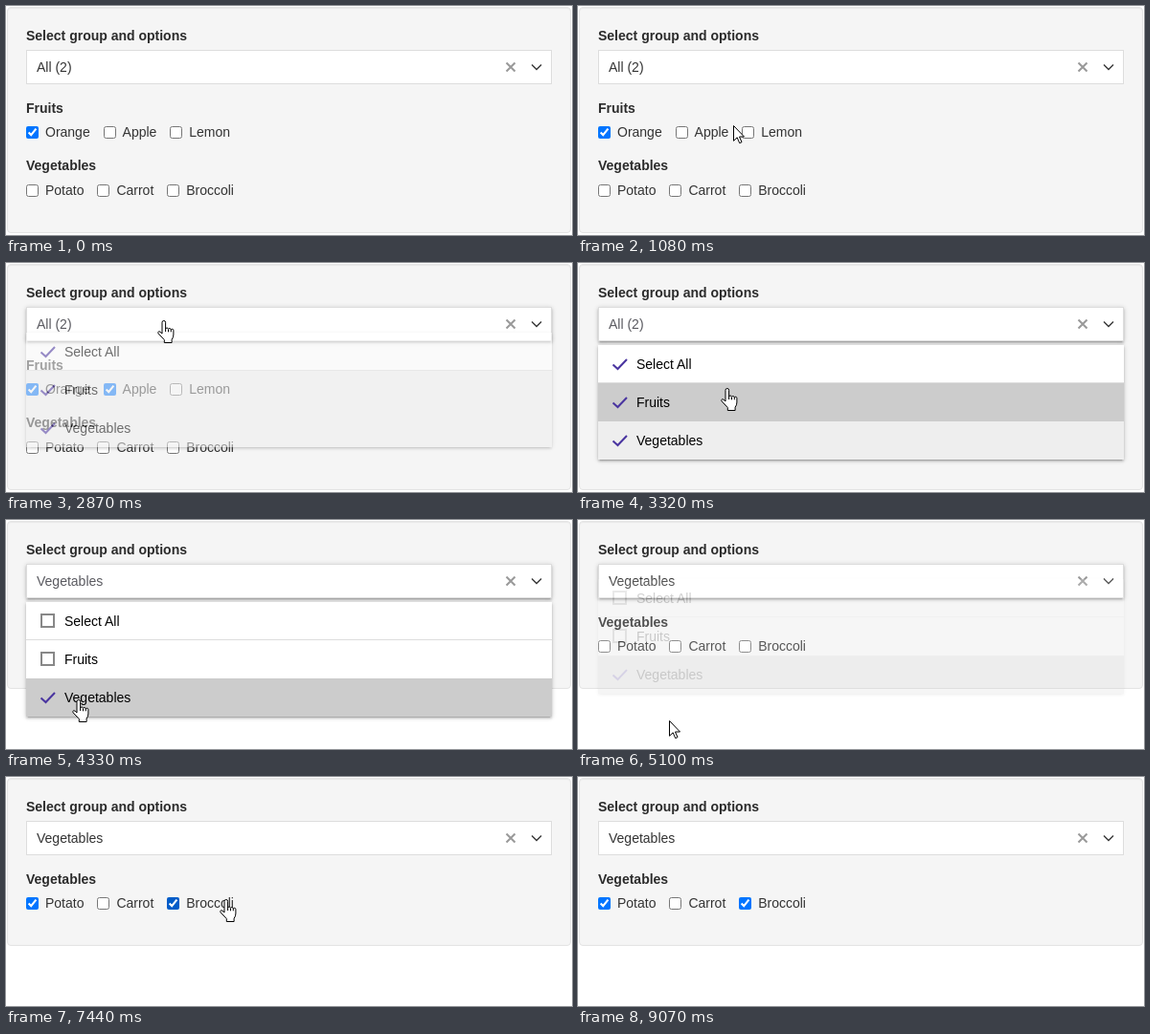
Recreate the animation shown at these times as an HTML page. Size 591x240 px, loop 9.76 s.

```html
<!DOCTYPE html>
<html lang="en">
<head>
<meta charset="utf-8">
<title>Group select</title>
<style>
  html, body { margin: 0; width: 100%; height: 100%; overflow: hidden; background: #fff; }
  body { font: 14px/20px "Liberation Sans", Arial, sans-serif; color: #333; position: relative; }
  body * { box-sizing: border-box; pointer-events: none; }
  body > *, .group > * { position: absolute; white-space: nowrap; }
  b { color: #2b2b2b; }
  #panel { left: 1px; top: 1px; width: 589px; height: 237px; background: #f5f5f5;
    border: 1px solid #e3e3e3; border-radius: 4px; box-shadow: inset 0 1px 1px rgba(0,0,0,.05); }
  #panel.short { height: 176px; }
  #title { left: 21px; top: 21px; }
  #button { left: 21px; top: 46px; width: 549px; height: 36px; padding: 7px 10px;
    background: #fff; border: 1px solid #ddd; }
  #button svg { position: absolute; left: 498px; top: 9px; }
  #button.focus, #list { box-shadow: 0 2px 2px rgba(0,0,0,.14), 0 3px 1px -2px rgba(0,0,0,.12), 0 1px 5px rgba(0,0,0,.2); }
  #button.open { color: #5a5a60; }
  .group { left: 21px; top: 97px; }
  .group > div { top: 25px; }
  .group.second { top: 157px; }
  .group.second > div { top: 26px; }
  label { display: inline-block; position: relative; padding-left: 20px; }
  label + label { margin-left: 10px; }
  label input { position: absolute; left: 0; top: 4px; width: 13px; height: 13px; margin: 0; }
  #list { left: 21px; top: 86px; width: 549px; background: #fff; color: #000; }
  .row { height: 40px; padding: 10px 0 0 40px; position: relative; }
  .row:first-child { border-bottom: 1px solid #ddd; }
  .row svg { position: absolute; left: 15px; top: 12px; overflow: visible; }
  .row path { fill: none; stroke-width: 2; }
  #cursor { left: 0; top: 0; overflow: visible; }
  #cursor path { fill: #fff; stroke: #000; stroke-linejoin: round; }
</style>
</head>
<body>
<div id="panel"></div>
<b id="title">Select group and options</b>
<div id="button"><span></span>
  <svg width="46" height="18" fill="none">
    <path d="M2.5 3.5l9 9m0-9l-9 9" stroke="#999" stroke-width="2"/>
    <path d="M29 5.5l5 5 5-5" stroke="#333" stroke-width="1.3"/>
  </svg>
</div>
<div id="list"></div>
<svg id="cursor" width="20" height="26">
  <path id="arrow" d="M.5.5V16.3l3.7-3.5 2.5 5.9 2.3-1-2.5-5.7h5z"/>
  <g id="hand" transform="translate(-6)">
    <path d="M5 14V2.3a1.8 1.8 0 0 1 3.6 0V9a1.5 1.5 0 0 1 2.9.3 1.5 1.5 0 0 1 2.8.6 1.4 1.4 0 0 1 2.6.7V15q0 3-1.8 5.2V23.5H7.3V20.5L1 13.8q-.8-1.6.8-2.1 1-.2 3.2 2.3z"/>
    <path d="M8.6 9v3M11.5 9.5v2.8M14.3 10v2.3"/>
  </g>
</svg>
<script>
const LOOP = 9760, STEPS = 126;
const ENTER = 210, FOCUS = 2550, OPEN = 2700, UNTICK = 3870, REGROUP = 4020, CLOSE = 4865, LEAVE = 9060;
const FADE = 300, SLIDE = 29;
const checkedFrom = { Orange: 0, Apple: 1390, Potato: 6040, Broccoli: 7430 };

// Pointer moves; it rests in between.
const moves = [
  { from: 150, to: 370, x: 250, y: 123 },
  { from: 530, to: 1320, x: 125, y: 126 },   // Apple
  { from: 1700, to: 2080, x: 157, y: 125 },
  { from: 2080, to: 2480, x: 164, y: 60 },   // open the list
  { from: 3010, to: 3320, x: 155, y: 131 },  // Fruits row
  { from: 4180, to: 4330, x: 75, y: 188 },   // Vegetables row
  { from: 4330, to: 5100, x: 95, y: 210 },   // click away
  { from: 5340, to: 5720, x: 67, y: 128 },   // Potato
  { from: 6140, to: 6270, x: 73, y: 128 },
  { from: 6430, to: 6980, x: 229, y: 128 },  // Broccoli
  { from: 8520, to: 9070, x: 480, y: 245 },
];

const $ = id => document.getElementById(id);
const progress = (t, from, to) => Math.min(1, Math.max(0, (t - from) / (to - from)));
const between = (v, low, high) => v >= low && v < high;

function addGroup(name, options) {
  const group = document.createElement("div");
  group.className = "group";
  group.innerHTML = `<b>${name}</b><div>` +
    options.map(o => `<label><input type="checkbox">${o}</label>`).join(" ") + "</div>";
  $("list").before(group);
  return group;
}
const fruits = addGroup("Fruits", ["Orange", "Apple", "Lemon"]);
const vegetables = addGroup("Vegetables", ["Potato", "Carrot", "Broccoli"]);
const labels = [...document.querySelectorAll("label")];

$("list").innerHTML = ["Select All", "Fruits", "Vegetables"].map(name =>
  `<div class="row"><svg width="15" height="15"><path/></svg>${name}</div>`).join("");
const rows = [...document.querySelectorAll(".row")];

// The picture refreshes at a fixed rate.
const stepTime = t => Math.floor(t / LOOP * STEPS + 0.3) * LOOP / STEPS;

function pointerAt(t) {
  let x = 450, y = 231;
  for (const move of moves) {
    const p = progress(t, move.from, move.to);
    x += (move.x - x) * p;
    y += (move.y - y) * p;
  }
  return { x: Math.round(x), y: Math.round(y) };
}

function drawList(t, pointerY) {
  const shown = progress(t, OPEN, OPEN + FADE) - progress(t, CLOSE, CLOSE + FADE);
  const list = $("list");
  list.style.opacity = shown;
  list.style.visibility = shown > 0 ? "visible" : "hidden";
  list.style.transform = `translateY(${-SLIDE * (1 - shown)}px)`;
  const hovered = Math.min(2, Math.floor((pointerY - 86) / 40));
  rows.forEach((row, i) => {
    const ticked = i === 2 || t < UNTICK;
    row.style.background = i === hovered ? "#ccc" : ticked && i ? "#eee" : "#fff";
    const mark = row.querySelector("path");
    mark.setAttribute("d", ticked ? "M.5 8.5L5.5 13 15 3" : "M1 1h13v13H1z");
    mark.setAttribute("stroke", ticked ? "#4a35a0" : "#888");
  });
  return shown > 0;
}

function draw(now) {
  const t = stepTime(now % LOOP);
  const { x, y } = pointerAt(t);
  const visible = between(t, ENTER, LEAVE);
  const single = t >= REGROUP;

  $("panel").classList.toggle("short", single);
  fruits.style.display = single ? "none" : "";
  vegetables.classList.toggle("second", !single);

  const button = $("button");
  button.firstChild.textContent = t < UNTICK ? "All (2)" : "Vegetables";
  button.classList.toggle("focus", between(t, FOCUS, CLOSE + FADE));
  button.classList.toggle("open", between(t, OPEN, CLOSE));
  const listShown = drawList(t, y);

  const isOver = element => {
    const r = element.getBoundingClientRect();
    return visible && between(x, r.left, r.right) && between(y, r.top, r.bottom);
  };
  let pointing = isOver(button) || listShown && isOver($("list"));
  for (const label of labels) {
    const hover = !listShown && isOver(label);
    pointing = pointing || hover;
    const input = label.firstChild;
    input.checked = t >= checkedFrom[label.textContent];
    input.style.accentColor = hover ? "#005cc8" : "#0075ff";
  }

  const cursor = $("cursor");
  cursor.style.display = visible ? "" : "none";
  cursor.style.transform = `translate(${x}px, ${y}px)`;
  $("hand").style.display = pointing ? "" : "none";
  $("arrow").style.display = pointing ? "none" : "";
}

const start = performance.now();
function tick() {
  draw(performance.now() - start);
  requestAnimationFrame(tick);
}
tick();
</script>
</body>
</html>
```
